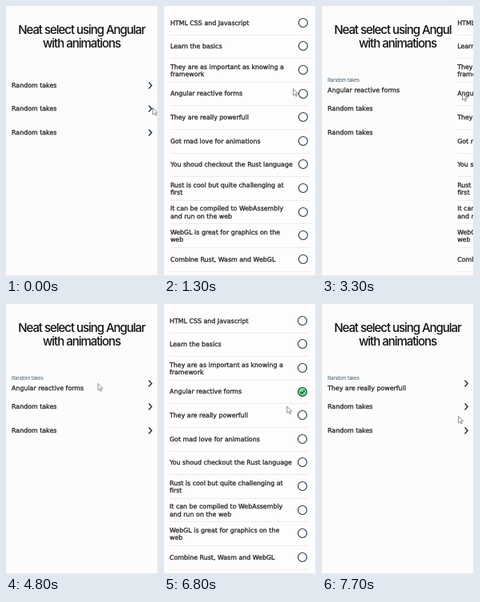
These frames come from a looping animation (190x338 px, 8 s). An HTML page:

```html
<!DOCTYPE html>
<html lang="en">
<head>
<meta charset="utf-8">
<title>Neat select</title>
<style>
  html, body { margin: 0; width: 100%; height: 100%; overflow: hidden; background: #fcfcfc; }
  #stage { position: relative; width: 190px; height: 338px; overflow: hidden; background: #fcfcfc; }
  #stage::after {
    content: ""; position: absolute; inset: 0; box-sizing: border-box;
    border: solid #e9e9e9; border-width: 0 1px 1px 0;
  }
  h1 {
    position: absolute; left: 0; top: 21px; width: 189px; margin: 0; text-align: center;
    font: 500 15px/17px Inter, sans-serif; letter-spacing: -1.03px; color: #111; white-space: pre;
  }
  .text {
    position: absolute; left: 7px; transform: translateY(-50%); white-space: pre;
    font: 7.9px/9.4px "DejaVu Sans", sans-serif; color: #222; -webkit-text-stroke: .28px #222;
  }
  .label {
    position: absolute; left: 7px; top: 89px; white-space: pre;
    font: 6.5px/8px Inter, sans-serif; letter-spacing: -.33px; color: #48626f;
  }
  #panel { position: absolute; inset: 0; background: #fdfdfd; }
  .divider { position: absolute; left: 7px; width: 174px; height: 1px; background: #ececec; }
  .tap { position: absolute; left: 167.5px; width: 15px; height: 14px; background: #a9e1ea; }
  svg { position: absolute; overflow: visible; fill: none; stroke: #25343d; }
  #cursor { left: 0; top: 0; fill: #fff; stroke: #777; stroke-width: .8; }
</style>
</head>
<body>
<div id="stage">
  <h1>Neat select using Angular
with animations</h1>
  <div id="fields"></div>
  <div id="panel"></div>
  <svg id="cursor" width="8" height="11"><path d="M.5 .5V9l2-1.8 1.4 3 1.3-.6-1.4-2.9h2.7z"/></svg>
</div>
<script>
const WIDTH = 190, DURATION = 8000, FRAME = 100, PITCH = 29.6;
const PLACEHOLDER = "Random takes";
const options = [
  "HTML CSS and Javascript", "Learn the basics", "They are as important as knowing a\nframework",
  "Angular reactive forms", "They are really powerfull", "Got mad love for animations",
  "You shoud checkout the Rust language", "Rust is cool but quite challenging at\nfirst",
  "It can be compiled to WebAssembly\nand run on the web", "WebGL is great for graphics on the\nweb",
  "Combine Rust, Wasm and WebGL"
];

// The panel opens, an option is tapped, and the panel closes again.
const visits = [
  { open: 1000, tap: 3000, option: 3 },
  { open: 5100, tap: 7300, option: 4 }
];
const cursorStart = { x: 183, y: 127 };
const cursorMoves = [
  { at: 0, time: 500, x: 161, y: 103 },
  { at: 1700, time: 400, x: 200, y: 104 },
  { at: 2500, time: 200, x: 175, y: 109 },
  { at: 4000, time: 400, x: 129, y: 98 },
  { at: 4600, time: 200, x: 114.5, y: 99 },
  { at: 6100, time: 1000, x: 170, y: 140 }
];

const $ = id => document.getElementById(id);
const add = (parent, html) => {
  parent.insertAdjacentHTML("beforeend", html);
  return parent.lastElementChild;
};
const addText = (parent, y, text) =>
  add(parent, `<div class="text" style="top:${y + .5}px">${text}</div>`);
const show = (element, visible) => element.style.display = visible ? "" : "none";

const progress = (t, start, time) => Math.min(1, Math.max(0, (t - start) / time));
const smooth = u => u * u * (3 - 2 * u);

const values = [0, 1, 2].map(i => {
  const y = 99 + PITCH * i;
  add($("fields"), `<svg style="left:178px;top:${y - 4.5}px" width="5" height="9" stroke-width="1.4">
    <path d="M.5 .5l3.6 4-3.6 4"/></svg>`);
  return addText($("fields"), y, PLACEHOLDER);
});
const label = add($("fields"), `<div class="label">${PLACEHOLDER}</div>`);

const rows = options.map((text, i) => {
  const y = 21 + PITCH * i, panel = $("panel");
  addText(panel, y, text);
  add(panel, `<div class="divider" style="top:${Math.round(y + 14.5)}px"></div>`);
  const radio = add(panel, `<svg style="left:172.8px;top:${y - .2}px" width="1" height="1" stroke-width="1.1">
    <circle r="5.5"/><path d="M-2.7 .1l2 2 3.5-4"/></svg>`);
  const tap = add(panel, `<div class="tap" style="top:${y - 6.4}px"></div>`);
  return { radio, tap };
});

function panelOffset(t) {
  const visit = visits.findLast(({ open }) => open <= t);
  if (!visit) return WIDTH;
  const opened = smooth(progress(t, visit.open + 108, 200));
  const closed = smooth(progress(t, visit.tap + 80, 290));
  return WIDTH * (1 - opened + closed);
}

function cursorPosition(t) {
  return cursorMoves.reduce((from, move) => {
    const u = progress(t, move.at, move.time);
    return { x: from.x + (move.x - from.x) * u, y: from.y + (move.y - from.y) * u };
  }, cursorStart);
}

function draw(t) {
  // The newest choice is highlighted while the previous one fades from its row.
  const [chosen, previous] = visits.filter(({ tap }) => tap <= t).reverse();
  const tapping = chosen && t < chosen.tap + 400;

  rows.forEach(({ radio, tap }, i) => {
    const selected = i === chosen?.option;
    show(tap, tapping && selected);
    show(radio, !(tapping && (selected || i === previous?.option)));
    const [circle, check] = radio.children;
    show(check, selected);
    circle.style.fill = selected ? "#62df8c" : "none";
  });

  show(label, chosen);
  values[0].textContent = chosen ? options[chosen.option] : PLACEHOLDER;
  values[0].style.top = chosen ? "105.6px" : "99.5px";

  $("panel").style.transform = `translateX(${panelOffset(t)}px)`;
  const { x, y } = cursorPosition(t);
  $("cursor").style.transform = `translate(${x}px, ${y}px)`;
}

const start = performance.now();
function tick() {
  const t = (performance.now() - start) % DURATION;
  draw(Math.floor(t / FRAME) * FRAME);
  requestAnimationFrame(tick);
}
tick();
</script>
</body>
</html>
```
